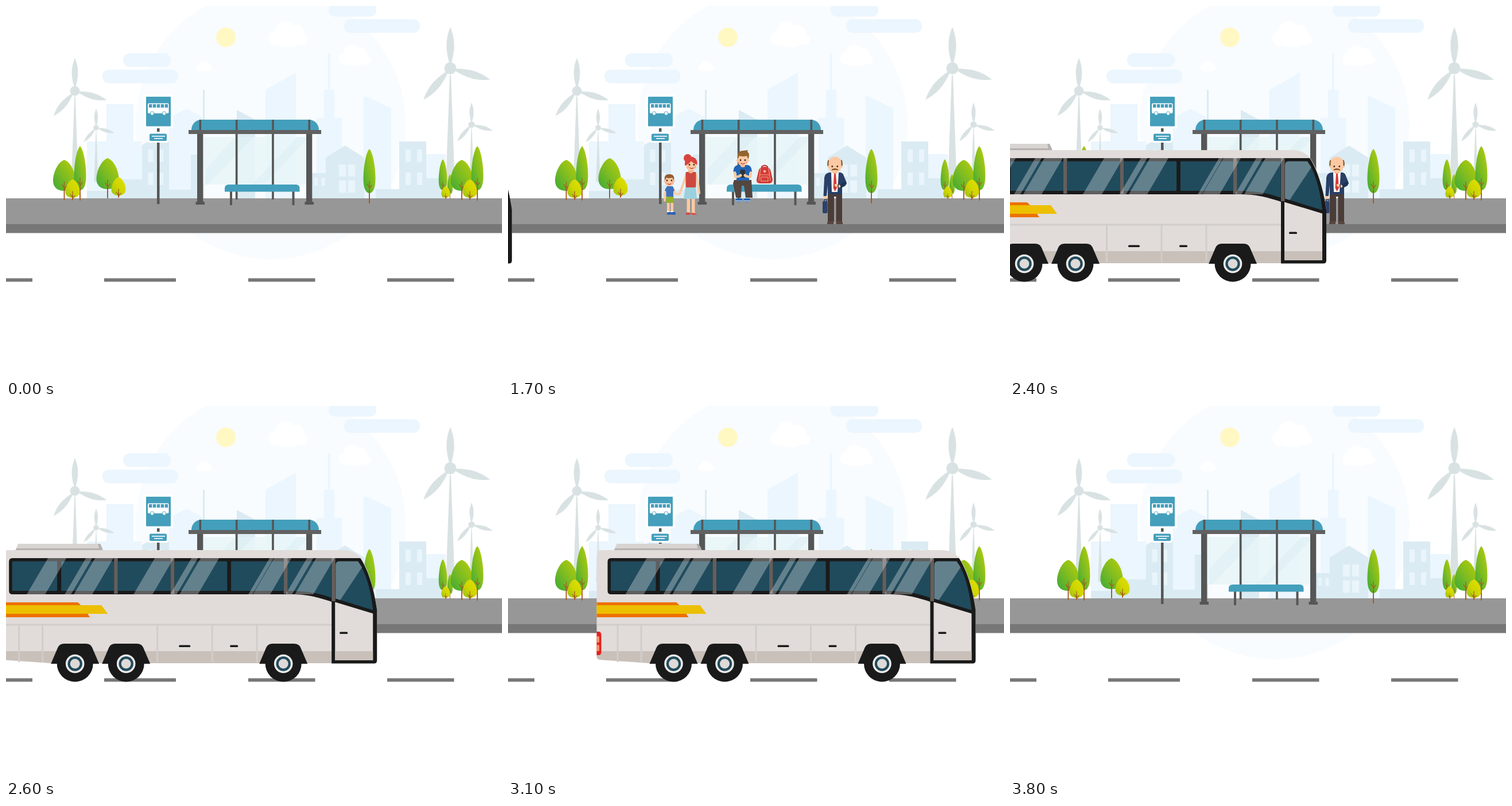
Animation, 864 px wide and 648 px high, one loop 5.8 s. Source, as an HTML page:

```html
<!DOCTYPE html>
<html lang="en">
<head>
<meta charset="utf-8">
<title>Bus stop</title>
<style>
html, body { margin: 0; width: 100%; height: 100%; overflow: hidden; background: #fff; }
svg { display: block; width: 864px; height: 648px; }
</style>
</head>
<body>
<svg id="stage" viewBox="0 0 864 648"></svg>
<script>
const TEAL = '#449fbc', DARK = '#565656', LIGHT = '#ebf6fe', MID = '#dbebf3', PANE = '#e9f5fb';
const SKIN = '#fcc9a2', BLACK = '#1a1a1a', GLASS = '#204b5c', BODY = '#e1dcd9', SILL = '#c9c0ba', SEAM = '#d0cdca';
const HAZE = 'rgba(255,255,255,.3)';

// Shape helpers; rectangles are given by place and size
const rect = (x, y, w, h, fill, r = 0) =>
  `<rect x="${x}" y="${y}" width="${w}" height="${h}" rx="${r}" fill="${fill}"/>`;
const path = (d, fill) => `<path d="${d}" fill="${fill}"/>`;
const disc = (x, y, r, fill, ry = r) => `<ellipse cx="${x}" cy="${y}" rx="${r}" ry="${ry}" fill="${fill}"/>`;
const line = (d, color, w) =>
  `<path d="${d}" fill="none" stroke="${color}" stroke-width="${w}" stroke-linecap="round" stroke-linejoin="round"/>`;
const each = (list, fn) => list.map(fn).join('');
const row = (n, x, step, fn) => each([...Array(n).keys()], i => fn(x + i * step, i));
const at = (x, y, s, art) => `<g transform="translate(${x} ${y}) scale(${s})">${art}</g>`;

// Buildings stand on the pavement at y = 335
const block = (x, y, w, fill) => rect(x, y, w, 335 - y, fill);
const gable = (x, y, w, rise, fill) =>
  path(`M${x} 335V${y}L${x + w / 2} ${y - rise}L${x + w} ${y}V335z`, fill);
const panes = (x, y, gapX, gapY, w, h) =>
  row(2, x, gapX, px => row(2, y, gapY, py => rect(px, py, w, h, PANE)));

const blade = a => `<path transform="rotate(${a})" fill="#d9e2e3" d="M-2-10C-9-35-8-52 0-72C8-52 9-35 2-10z"/>`;
const turbine = (x, y, s) => at(x, y, s,
  each([0, 106, 220.5], blade) + disc(0, 0, 10.5, '#d9e2e3') + path('M-1 12H1L8 205H-8z', '#d9e2e3'));

// Width, height and stem below the crown
const KINDS = { round: [39, 54, 15, 'green'], tall: [21, 77, 17, 'green'], bush: [25, 32, 3, 'yellow'] };
function tree(kind, x, y, s = 1) {
  const [w, h, stem, tone] = KINDS[kind], fork = h * .78;
  const leaf = 'M0 0C.3 .08 .5 .42 .5 .67C.5 .9 .28 1 0 1C-.28 1-.5 .9-.5 .67C-.5 .42-.3 .08 0 0z';
  return at(x, y, s,
    `<path transform="scale(${w} ${h})" d="${leaf}" fill="url(#${tone})"/>` +
    line(`M0 ${h + stem}V${fork - 4}M0 ${fork + 7}l-4-6M0 ${fork + 9}l4-6`, '#a5591f', 1.2) +
    line(`M0 ${h + stem}V${h - 4}`, '#a5591f', 1.8));
}

const gradient = (id, low, mid, high) =>
  `<linearGradient id="${id}" x1=".1" y1=".85" x2=".8" y2=".15"><stop stop-color="${low}"/>
  <stop offset=".45" stop-color="${mid}"/><stop offset="1" stop-color="${high}"/></linearGradient>`;
const defs = gradient('green', '#4cae31', '#79ba24', '#a8c90f') + gradient('yellow', '#a5c614', '#cdd500', '#dfdc00');

const pill = (x, y, w) => rect(x, y, w, 23.5, LIGHT, 11);
const cloud = (x, y, s) => at(x, y, s,
  disc(-5, -6, 18, '#fff', 17) + disc(14, -3, 14, '#fff') + disc(-21, 6, 13, '#fff') +
  disc(23, 8, 12, '#fff', 10) + disc(0, 10, 24, '#fff', 12));
const sky = disc(461, 206, 235, '#f8fcff') + disc(383, 54.5, 17, '#fff8c3') +
  pill(204, 82.5, 83) + pill(168, 111, 132) + pill(562, -5, 83) + pill(589, 23, 132) +
  cloud(491, 50, 1) + cloud(607, 87, .82) + cloud(345, 105, .4);

const city =
  block(175, 171, 47, LIGHT) + block(141, 236, 96, LIGHT) + gable(284, 195, 61, 16, LIGHT) +
  path('M452 335V146L505 116V335zM623 335V156L671 178V335z', LIGHT) +
  block(561, 82, 3.5, LIGHT) + block(554, 146, 18, LIGHT) + block(541, 195, 44, LIGHT) + block(732, 258, 34, LIGHT) +
  rect(343, 146, 3, 54, MID) + path('M402 335V181L434 198V335z', MID) +
  block(141, 322, 61, MID) + block(202, 302, 35, MID) + block(284, 320, 38, MID) + block(322, 259, 23, MID) +
  path('M237 335V242L249 236H284V335z', MID) + panes(247.5, 250, 17.5, 40, 9, 22) +
  block(533, 291, 26, MID) + row(2, 537, 12.5, x => rect(x, 299, 6, 14, PANE)) +
  gable(557, 264, 67, 21, MID) + panes(580, 276, 16, 28, 12, 21) +
  block(644, 319, 42, MID) + block(685, 236, 47, MID) + panes(696, 250, 20, 40, 9, 22) + block(732, 300, 34, MID);

const nature =
  turbine(120, 148, .8) + turbine(157, 212, .46) + turbine(774, 108.5, 1) + turbine(811, 206.5, .53) +
  rect(0, 335, 864, 45, '#979797') + rect(0, 380, 864, 15.5, '#777') +
  tree('round', 101.5, 268) + tree('tall', 129, 244) + tree('bush', 116, 302) +
  tree('round', 177, 265) + tree('bush', 196, 298) + tree('tall', 633, 249) +
  tree('tall', 761, 267, .7) + tree('tall', 773.5, 293, .45) + tree('bush', 766, 314, .62) +
  tree('round', 794, 268) + tree('tall', 821, 244) + tree('bush', 808, 302) +
  rect(-5, 474.3, 51, 6, '#777') + rect(171, 474.3, 125, 6, '#777') +
  row(2, 422, 242, x => rect(x, 474.3, 116.500, 6, '#777'));

const sign =
  rect(263, 210, 4.5, 135, DARK) + rect(240, 154, 51, 59, '#fff', 3) + rect(244, 158, 43, 51.5, TEAL, 1) +
  rect(247, 169.5, 36.5, 17.5, '#fff', 2) + row(5, 249, 6.9, x => rect(x, 171, 5.400, 6, TEAL)) +
  row(2, 254.5, 21, x => disc(x, 187, 3.6, TEAL) + disc(x, 187, 2.7, '#fff')) +
  rect(247, 219, 36, 19, '#fff', 3) + rect(250, 222.5, 30, 12.5, TEAL, 2) +
  rect(254, 226, 23, 1.6, '#fff') + rect(258, 230, 15, 1.6, '#fff');

const shelter =
  `<g opacity=".85">${rect(343, 228, 180, 83, '#e9f6f9') +
    path('M348 283L400 228H432L352 311H348zM428 311L508 228H523V234L449 311z', '#e0f1f5')}</g>` +
  row(2, 399.8, 63.3, x => rect(x, 222, 3.700, 115, DARK)) +
  row(2, 333, 190, x => rect(x, 222, 10.3, 120, DARK) + rect(x - 2.5, 341, 15.5, 5, DARK)) +
  path('M323 216C323 206 330 198 341 198H527C538 198 545 206 545 216z', TEAL) +
  row(4, 336.6, 63.3, x => rect(x, 198, 3.6, 19, DARK)) + rect(318, 216, 231, 7, '#616161') +
  row(2, 390, 108.5, x => rect(x, 322, 4, 25, DARK)) +
  path('M381 323.5V318Q381 311 388 311H504.5Q511.5 311 511.5 318V323.5z', TEAL);

const eyes = (x, y, d) => disc(x - d, y, 1.4, '#3a2a22') + disc(x + d, y, 1.4, '#3a2a22');
const face = (x, y) => eyes(x, y, 4) + disc(x - 6, y + 4, 1.7, '#f8a98c') + disc(x + 6, y + 4, 1.7, '#f8a98c') +
  line(`M${x - 3} ${y + 5.5}q3 2.6 6 0`, '#b8403a', 1.2);

const sitter =
  path('M394 303H424L426 334H414L411 313H407L406 334H397L392 309z', '#554640') +
  row(2, 397, 14, x => rect(x, 335, 11, 6, '#2467b8', 2) + rect(x, 339, 11, 1, '#fff')) +
  path('M400 277H418Q424 278 425 289L420 291V304H398V291L392.5 289Q393 278 400 277z', '#2064b4') +
  line('M395 290L396 298L405 296M423 290L422 298L413 296', SKIN, 4.2) +
  rect(404.5, 285, 8.5, 14, '#333', 3) + row(2, 405, 8, x => disc(x, 295, 2.5, SKIN)) +
  rect(405, 274, 8, 7, '#f3b58d', 3) + row(2, 399.5, 19, x => disc(x, 269, 2, SKIN)) + rect(400, 256, 18, 22, SKIN, 8) +
  path('M400 267Q398 252 410 252L418 251L417 254Q422 257 418.5 267L416 261Q408 263 403 261z', '#93642c') +
  face(409, 268.5);

const backpack =
  line('M442 284V280Q447 275 452 280V284', '#b6302d', 2) +
  path('M436 289Q437 280 447 280Q457 280 458 289L461 302Q461 309 455 309H439Q432 309 433 302z', '#d23c34') +
  line('M440 283L437 304M454 283L457 304M439 294H455M441 298H453V305H441z', '#f0b7a8', .9) +
  disc(447, 288, 2.2, '#f0b7a8');

const mother =
  line('M311 292L306 308L299 327M327 292L331 309L333 326', SKIN, 4) +
  row(2, 311.5, 8.5, x => rect(x, 334, 5.5, 27, SKIN)) +
  path('M310 363.5V361Q313 358 318 361V363.5zM320 363.5V360Q325 360 330 363.5z', '#d8443f') +
  path('M309 315H327L329 336H306z', '#9bd0dc') + rect(309.5, 289, 18, 27, '#cc4740', 2) +
  path('M314 283H323V289Q318.5 294 314 289z', '#f3b58d') +
  disc(313, 265, 7, '#d8443f') + disc(319, 273, 10.5, '#d8443f') + rect(309.5, 267, 19, 20, SKIN, 9) +
  path('M308 278Q307 264 319 264Q330 265 329.5 276Q322 274 319 270Q315 276 308 278z', '#d8443f') +
  face(320, 276.5);

const boy =
  line('M276 318L273 328L273 339M288 318L291 327L298 328', SKIN, 3.4) +
  row(2, 277, 6.5, x => rect(x, 341, 4.5, 18, SKIN) + rect(x, 357, 4.5, 3, '#fff')) +
  rect(277, 359, 7, 4.5, '#2c5fb4', 1.5) + rect(283.5, 359, 8.500, 4.5, '#2c5fb4', 1.5) +
  rect(275.5, 330, 13, 13, '#94b02c') + path('M277 314H287L290 321L288 323V332H275.5V323L273 321z', '#3f70bf') +
  row(2, 272.5, 17, x => disc(x, 305, 1.8, SKIN)) + rect(273, 295, 16, 19, SKIN, 7.5) +
  path('M273 304Q271 293 281 293Q291 293 289 304L286 299Q279 301 276 299z', '#955c31') +
  face(281, 304);

const elder =
  disc(552, 334, 3.3, SKIN) + rect(548, 340, 8.5, 21, '#2b4269', 2) + line('M551 340V337H555V340', '#2b4269', 1.5) +
  path('M557 323H582V376H571.5V332H568V376H557z', '#4a3c38') +
  path('M556 380V377Q557 374 567 374V380zM571.5 380V374Q582 374 583 377V380z', '#5a453e') +
  path('M560 290H579Q584 291 585 296L590 308Q590 313 582 316V328H557V312L555 331H549.5L551 299Q552 291 560 290z', '#283f66') +
  path('M563 290H576L574 324H564z', '#fff') + path('M568 292H571L573 317L569.5 323L566.5 317z', '#d43b35') +
  line('M586 309L579 314', '#1f3355', 5) + line('M577 314L571 312', SKIN, 4.5) + line('M575 311V316', '#333', 1.5) +
  rect(565, 285, 9, 7, '#f3b58d', 3) +
  row(2, 558.5, 22, x => disc(x, 275, 2.3, '#7d5a35', 7) + disc(x, 280, 2, SKIN)) +
  rect(558.5, 262.5, 22, 27.5, SKIN, 10) + eyes(569.3, 279.5, 4.5) +
  path('M563.5 286.5Q564 283 569.3 283Q575 283 575.5 286.5Q569.5 284.5 563.5 286.5z', '#7d4f25');

const wheel = x => at(x, 449, 1,
  path('M-42 0L-30-28Q-27-35-19-35H19Q27-35 30-28L42 0z', BLACK) + path('M-22-22Q-15-31 0-31Q15-31 22-22z', '#0d0d0d') +
  disc(0, 0, 31.5, BLACK) + disc(0, 0, 16.3, '#eeeae8') + disc(0, 0, 12.7, GLASS) + disc(0, 0, 8.500, '#dedad7'));

const handle = (x, y, w) => rect(x, y, w, 3.5, BLACK, 1.5);
const glint = (x, w) => path(`M${x} 328l37-63h${w}l-37 63z`, HAZE);
// A thin reflection followed by a broad one
const glints = x => glint(x, 11) + glint(x + 16, 32);
const PITCH = 98.6;

const coach =
  path('M82 240H223L228 246L230 252H77z', '#d8d4d1') + path('M221 240H225L230 252H77L79 248H223z', '#b5b0ae') +
  path('M57 251H648C664 251 674 258 680 267C694 288 703 325 707 355V448H140L52 442Q47 441 47 436V261Q47 251 57 251z', BODY) +
  path('M47 427H632V448H140L52 442Q47 441 47 436z', SILL) +
  path('M47 342H186L191 347H47zM47 362H203L207 368H47z', '#ed7100') + path('M47 347H227L238 362H47z', '#ecbf00') +
  rect(47, 379.5, 583, 3, SEAM) + each([83.5, 124.5, 324.5, 420, 498], x => rect(x - 1.5, 381, 3, 65, SEAM)) +
  path('M47 393H50Q55 393 55 399V428Q55 434 50 434H47z', '#e3201f') + row(2, 401, 15, y => rect(47, y, 4.5, 11, '#f3966a', 1.5)) +
  path('M72 265H678C693 287 703 325 707 355V443Q707 448.5 702 448.5H628V341C600 332 585 328 555 328H72Q66 328 66 322V271Q66 265 72 265z', BLACK) +
  path('M634 341.5L700 361.5V443H634z', BODY) + rect(634, 427, 66, 16, SILL) +
  rect(71.5, 270.5, 78.5, 51.5, GLASS, 1.5) + row(4, 157, PITCH, x => rect(x, 270.5, 92, 51.5, GLASS, 1.5)) +
  path('M551 270.5H627.5V334C605 326 588 322.5 551 322z', GLASS) +
  path('M635 277Q635 270.5 641 270.5H674C689 291 697 326 700 355.500L635 335.500z', GLASS) +
  each([1, 2, 4], i => rect(150.4 + i * PITCH, 265, 6.5, 62, '#645f5d')) + rect(628, 265, 6.5, 75, '#645f5d') +
  glint(97, 32) + glints(163) + glint(283, 33) + glints(347) + glint(483, 7) + glint(491, 30) + glints(548) +
  path('M635 277Q635 270.5 641 270.5H674L681 281L643 338L635 335.500z', HAZE) +
  handle(362, 416.5, 20) + handle(451, 416.5, 14) + handle(642, 393.5, 14) + each([181, 270, 544], wheel);

const LOOP = 5800, STEP = 100, STOP = 2900;
const actors = [
  { art: sitter + backpack, from: 100, to: STOP },
  { art: mother + boy, from: 600, to: STOP },
  { art: elder, from: 1100, to: STOP },
  { art: coach, from: 1700, to: 3800 },
];

const stage = document.getElementById('stage');
stage.innerHTML = defs + sky + city + nature + sign + shelter + each(actors, a => `<g class="actor">${a.art}</g>`);
const nodes = [...stage.querySelectorAll('.actor')];

// Distance of the coach from its stopping place: it brakes, then pulls away
function coachX(t) {
  const n = (t - STOP) / STEP;
  return n > 0 ? 406 * (n / 5) ** 1.45 : 1.25 * n - 6.87 * n ** 2 - .176 * n ** 3;
}

function draw(now) {
  const t = Math.floor(now % LOOP / STEP) * STEP;
  actors.forEach(({ from, to }, i) =>
    nodes[i].setAttribute('visibility', t >= from && t < to ? 'visible' : 'hidden'));
  nodes[3].setAttribute('transform', `translate(${coachX(t).toFixed(1)} 0)`);
}

let start;
function tick(now) {
  start ??= now;
  draw(now - start);
  requestAnimationFrame(tick);
}
draw(0);
requestAnimationFrame(tick);
</script>
</body>
</html>
```
